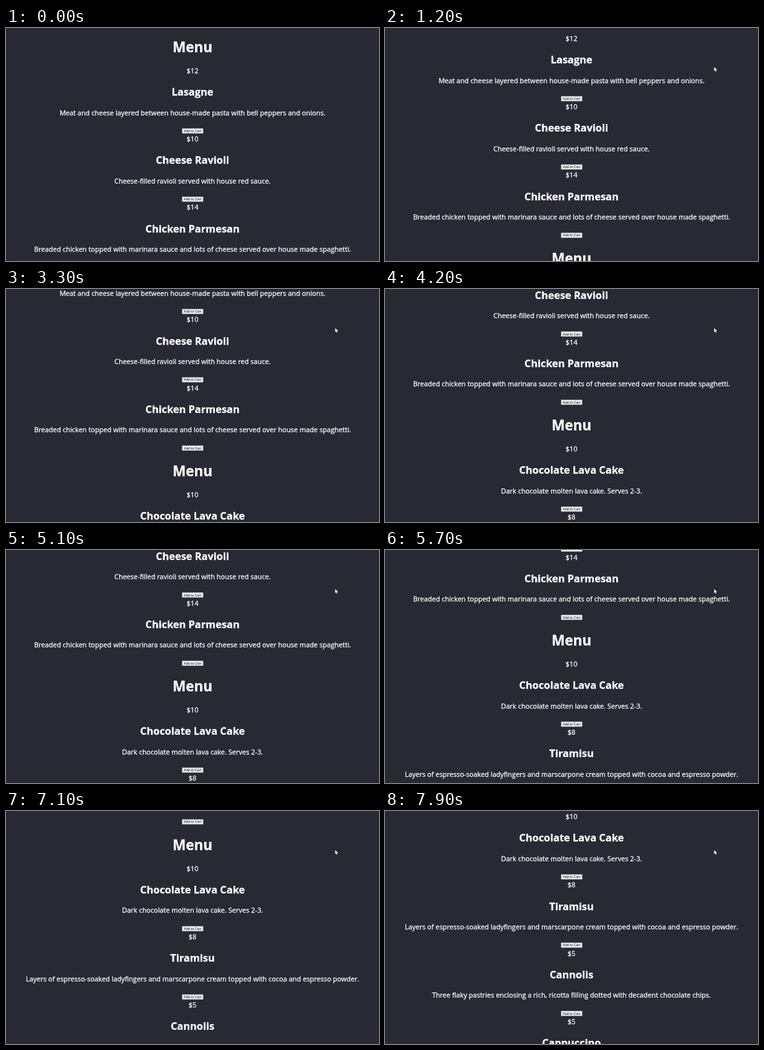
An HTML page with a canvas for the animation above (8 s loop, 600 by 376 pixels).

```html
<!DOCTYPE html>
<html lang="en">
<head>
<meta charset="utf-8">
<title>Menu</title>
<style>
  html, body { margin: 0; width: 100%; height: 100%; overflow: hidden; background: #282a33; }
  canvas { display: block; width: 600px; height: 376px; }
</style>
</head>
<body>
<canvas id="stage"></canvas>
<script>
const W = 600, H = 376, LOOP = 8000, STEP = 100;
const SECTION = 392.8, ITEM = 110.2;
const FACE = '"Open Sans", "Noto Sans", sans-serif';
const BODY = `11px ${FACE}`, H1 = `700 22.5px ${FACE}`, H2 = `700 16.4px ${FACE}`;

const sections = [
  [
    ['$12', 'Lasagne', 'Meat and cheese layered between house-made pasta with bell peppers and onions.'],
    ['$10', 'Cheese Ravioli', 'Cheese-filled ravioli served with house red sauce.'],
    ['$14', 'Chicken Parmesan', 'Breaded chicken topped with marinara sauce and lots of cheese served over house made spaghetti.']
  ],
  [
    ['$10', 'Chocolate Lava Cake', 'Dark chocolate molten lava cake. Serves 2-3.'],
    ['$8', 'Tiramisu', 'Layers of espresso-soaked ladyfingers and marscarpone cream topped with cocoa and espresso powder.'],
    ['$5', 'Cannolis', 'Three flaky pastries enclosing a rich, ricotta filling dotted with decadent chocolate chips.'],
    ['$5', 'Cappuccino', '']
  ]
];

// [time, scroll offset reached]
const flicks = [
  [1000, 52], [1900, 61.3], [2900, 129.8], [4000, 203.7],
  [5500, 277.8], [6400, 369], [7300, 452.6]
];

const canvas = document.getElementById('stage');
const ctx = canvas.getContext('2d');
const dpr = window.devicePixelRatio || 1;
canvas.width = W * dpr;
canvas.height = H * dpr;

const clamp = v => Math.max(0, Math.min(1, v));
const smooth = u => u * u * (3 - 2 * u);
const mix = (a, b, u) => a + (b - a) * u;

function scrollAt(t) {
  let y = 0;
  for (const [start, end] of flicks) y = mix(y, end, smooth(clamp((t - start + 60) / 120)));
  return y;
}

// A fine outline gives the text its slightly heavier weight.
function label(text, y, font, color = '#fff', outline = 0.3) {
  ctx.font = font;
  ctx.fillStyle = ctx.strokeStyle = color;
  ctx.fillText(text, W / 2, y);
  if (!outline) return;
  ctx.lineWidth = outline;
  ctx.strokeText(text, W / 2, y);
}

function button(y) {
  ctx.fillStyle = '#858688';
  ctx.fillRect(283, y - 4.2, 34.5, 8.6);
  ctx.fillStyle = '#ededed';
  ctx.fillRect(283.6, y - 3.6, 33.3, 7.4);
  label('Add to Cart', y + 2, '5.5px "Liberation Sans", Arial, sans-serif', '#111', 0);
}

function drawMenu() {
  sections.forEach((items, s) => {
    const top = s * SECTION;
    label('Menu', top + 39.3, H1);
    items.forEach(([price, name, about], i) => {
      const y = top + 73 + i * ITEM;
      label(price, y, BODY);
      label(name, y + 36.2, H2);
      label(about, y + 67.6, BODY);
      button(y + 93);
    });
  });
}

function drawCursor(t) {
  if (t < 200) return;
  const u = smooth(clamp((t - 200) / 600));
  ctx.save();
  ctx.translate(mix(558, 529.5, u), mix(28, 63, u));
  ctx.scale(0.42, 0.42);
  ctx.beginPath();
  [[0, 0], [0, 16], [4, 12.5], [6.5, 18.5], [9, 17.5], [6.5, 11.5], [11.5, 11.5]]
    .forEach(([x, y]) => ctx.lineTo(x, y));
  ctx.closePath();
  ctx.fillStyle = '#fff';
  ctx.strokeStyle = '#000';
  ctx.lineWidth = 1;
  ctx.stroke();
  ctx.fill();
  ctx.restore();
}

function draw(now) {
  const t = Math.floor((now % LOOP) / STEP) * STEP;
  ctx.setTransform(dpr, 0, 0, dpr, 0, 0);
  ctx.fillStyle = '#282a33';
  ctx.fillRect(0, 0, W, H);
  ctx.textAlign = 'center';
  ctx.lineJoin = 'round';
  ctx.save();
  ctx.translate(0, -scrollAt(t));
  drawMenu();
  ctx.restore();
  drawCursor(t);
}

let begin = null;
function tick(now) {
  if (begin === null) begin = now;
  draw(now - begin);
  requestAnimationFrame(tick);
}
draw(0);
requestAnimationFrame(tick);
</script>
</body>
</html>
```
